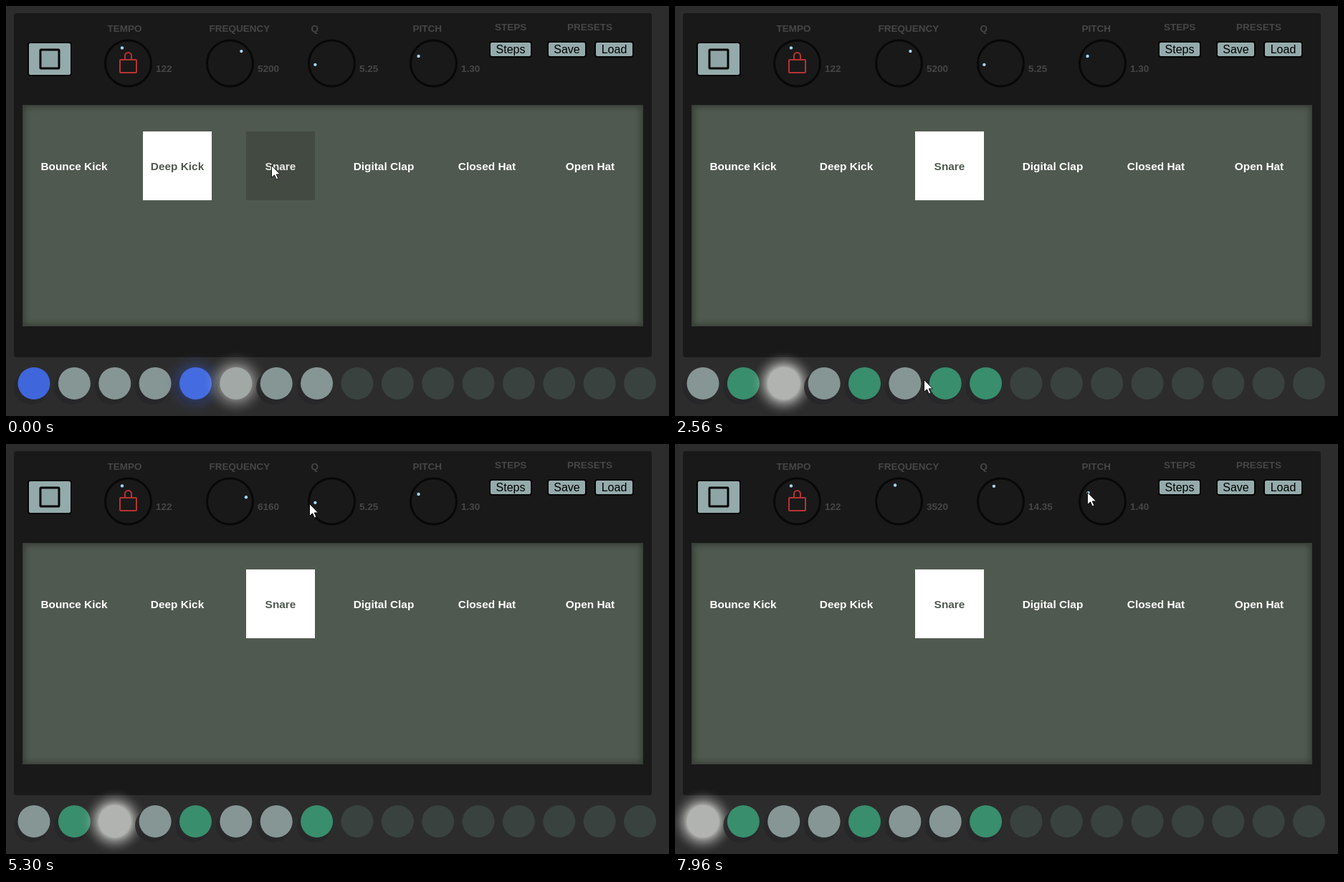
An HTML page with a canvas that plays this animation: 925x572 px, repeating every 8000 ms.

```html
<!DOCTYPE html>
<html lang="en">
<head>
<meta charset="utf-8">
<title>Drum machine</title>
<style>
html, body { margin: 0; width: 100%; height: 100%; overflow: hidden; background: #2c2c2c; }
canvas { display: block; }
</style>
</head>
<body>
<canvas id="stage" width="925" height="572"></canvas>
<script>
const ctx = document.getElementById('stage').getContext('2d');
const LOOP = 8000, TAU = Math.PI * 2;
const STEP = 117.3, STEP_OFFSET = 10, FIRST_STEP = 5, FADE = 28;
const PAD_GAP = 56.37, PAD_Y = 526.5, PAD_RADIUS = 22.5;
const SANS = '"Liberation Sans", Arial, sans-serif';
const INSTRUMENTS = ['Bounce Kick', 'Deep Kick', 'Snare', 'Digital Clap', 'Closed Hat', 'Open Hat'];

const BLUE = { base: [63, 102, 219], lit: [77, 116, 232], glow: [63, 102, 235] };
const GREEN = { base: [57, 142, 109], lit: [0, 229, 140], glow: [0, 229, 140] };
const GRAY = { base: [134, 150, 149], lit: [177, 179, 176], glow: [225, 228, 222] };

const INITIAL = { x: 370, y: 222, frequency: 5200, q: 5.25, pitch: 1.3 };
const PICK_SNARE = 380;
// Eased pointer gestures; a drag also changes a knob's value
const GESTURES = [
  { from: 890, until: 1470, x: 392, y: 470 },
  { from: 1470, until: 2050, x: 98, y: 521, toggles: 1 },
  { from: 2250, until: 2633, x: 372, y: 521, toggles: 6 },
  { from: 3617, until: 4350, x: 322, y: 66 },
  { from: 4450, until: 4900, x: 336, y: 79, frequency: 6160 },
  { from: 5060, until: 5300, x: 423, y: 83 },
  { from: 5430, until: 5980, x: 446, y: 64, q: 14.35 },
  { from: 6100, until: 6400, x: 335, y: 75 },
  { from: 6480, until: 7414, x: 306, y: 63, frequency: 3520 },
  { from: 7414, until: 7620, x: 575, y: 67, },
  { from: 7740, until: 7900, pitch: 1.4 }
];

const lerp = (a, b, p) => a + (b - a) * p;
const smooth = p => p * p * (3 - 2 * p);
const clamp = p => Math.max(0, Math.min(1, p));
const rgba = (c, alpha = 1) => `rgba(${c.map(Math.round)},${alpha})`;
const snap = (value, unit) => Math.round(value / unit) * unit;

function stateAt(t) {
  const state = { ...INITIAL };
  const snareHits = new Set([4, 6, 7]);
  for (const g of GESTURES) {
    const p = smooth(clamp((t - g.from) / (g.until - g.from)));
    for (const key in INITIAL) if (key in g) state[key] = lerp(state[key], g[key], p);
    if (p === 1 && 'toggles' in g && !snareHits.delete(g.toggles)) snareHits.add(g.toggles);
  }
  const snare = t >= PICK_SNARE;
  state.selected = snare ? 2 : 1;
  state.hits = snare ? snareHits : new Set([0, 4]);
  state.hitHue = snare ? GREEN : BLUE;
  return state;
}

function box(x, y, w, h, radius, fill, stroke, width = 2) {
  ctx.beginPath();
  ctx.roundRect(x, y, w, h, radius);
  if (fill) { ctx.fillStyle = fill; ctx.fill(); }
  if (stroke) { ctx.strokeStyle = stroke; ctx.lineWidth = width; ctx.stroke(); }
}

function disc(x, y, r, fill) {
  ctx.beginPath();
  ctx.arc(x, y, r, 0, TAU);
  ctx.fillStyle = fill;
  ctx.fill();
}

function text(str, x, y, color, font, align = 'left') {
  ctx.font = `${font} ${SANS}`;
  ctx.textAlign = align;
  ctx.fillStyle = color;
  ctx.fillText(str, x, y);
}
const label = (str, x, y) => text(str, x, y, '#464646', 'bold 13.5px');

function button(str, x, w) {
  box(x, 50, w, 21, 3, '#95abab', '#050505');
  text(str, x + w / 2, 66, '#000', '16px', 'center');
}

function knob(index, name, value, degrees) {
  const x = 170.5 + index * 142;
  label(name, x - 29, 36);
  label(value, x + 38.5, 92);
  ctx.beginPath();
  ctx.arc(x, 80, 32, 0, TAU);
  ctx.strokeStyle = '#080808';
  ctx.lineWidth = 3;
  ctx.stroke();
  const a = degrees * Math.PI / 180;
  disc(x + Math.sin(a) * 23.2, 80 - Math.cos(a) * 23.2, 2.2, '#a6d5ef');
}

function padlock() {
  box(159, 75, 23, 18, 1, null, '#b83232');
  ctx.beginPath();
  ctx.moveTo(166, 75);
  ctx.arc(170.5, 69.5, 4.5, Math.PI, 0);
  ctx.lineTo(175, 75);
  ctx.stroke();
}

function controls(state) {
  box(31, 51, 60, 46, 3, '#95abab', '#050505');
  box(48, 61, 26, 26, 1, '#8fa5a5', '#050505', 3);

  const frequency = snap(state.frequency, 80);
  const q = snap(state.q, 0.35);
  const pitch = snap(state.pitch, 0.05);
  knob(0, 'TEMPO', '122', -21.5);
  padlock();
  knob(1, 'FREQUENCY', String(frequency), (frequency - 3920) / 29.63);
  knob(2, 'Q', q.toFixed(2), (q - 17.5) / 0.1296);
  knob(3, 'PITCH', pitch.toFixed(2), -64.5 + (pitch - 1.3) * 54);

  label('STEPS', 682, 34);
  label('PRESETS', 783, 34);
  button('Steps', 675, 58);
  button('Save', 756, 53);
  button('Load', 822, 53);
}

function screen(state) {
  ctx.save();
  ctx.beginPath();
  ctx.rect(23, 138, 866, 309);
  ctx.clip();
  ctx.fillStyle = '#50594f';
  ctx.fillRect(23, 138, 866, 309);
  ctx.shadowColor = 'rgba(0,0,0,.65)';
  ctx.shadowBlur = 10;
  ctx.strokeStyle = '#363d36';
  ctx.lineWidth = 4;
  ctx.strokeRect(22, 137, 868, 311);
  ctx.restore();

  INSTRUMENTS.forEach((name, i) => {
    const x = 47 + i * 144;
    const selected = i === state.selected;
    const hovered = i === 2 && !selected;
    if (selected || hovered) {
      ctx.fillStyle = hovered ? '#434a42' : '#fff';
      ctx.fillRect(x, 175, 96, 96);
    }
    const color = selected ? '#50594f' : hovered ? '#e8e8e4' : '#fff';
    text(name, x + 48, 229, color, 'bold 15.4px', 'center');
  });
}

function glow(x, y, color, level) {
  const reach = 47, bands = 8;
  const g = ctx.createRadialGradient(x, y, PAD_RADIUS - 1, x, y, reach);
  for (let i = 0; i <= bands; i++) {
    const p = i / bands;
    g.addColorStop(p, rgba(color, 0.75 * level * (1 - p) ** 2));
  }
  disc(x, y, reach, g);
}

function pads(t, state) {
  const elapsed = t + STEP_OFFSET;
  const current = (Math.floor(elapsed / STEP) + FIRST_STEP) % 8;
  const previous = (current + 7) % 8;
  const fadeIn = 1 - (1 - clamp(elapsed % STEP / FADE)) ** 2;
  for (let i = 0; i < 16; i++) {
    const x = 39 + i * PAD_GAP;
    if (i > 7) { disc(x, PAD_Y, PAD_RADIUS, '#3a4240'); continue; }
    const hue = state.hits.has(i) ? state.hitHue : GRAY;
    const level = i === current ? fadeIn : i === previous ? 1 - fadeIn : 0;
    disc(x - 4, PAD_Y + 5.5, 24, 'rgba(38,38,41,.85)');
    if (level) glow(x, PAD_Y, hue.glow, level);
    disc(x, PAD_Y, PAD_RADIUS, rgba(hue.base.map((c, k) => lerp(c, hue.lit[k], level))));
  }
}

const arrow = new Path2D('M0 0V17L4 13.3L6.8 19.4L9.4 18.2L6.7 12.4H12Z');
function pointer({ x, y }) {
  ctx.save();
  ctx.translate(Math.round(x) + 0.5, Math.round(y) + 0.5);
  ctx.fillStyle = '#fff';
  ctx.strokeStyle = '#111';
  ctx.lineWidth = 1;
  ctx.fill(arrow);
  ctx.stroke(arrow);
  ctx.restore();
}

function draw(t) {
  const state = stateAt(t);
  ctx.fillStyle = '#2c2c2c';
  ctx.fillRect(0, 0, 925, 572);
  box(11, 10, 890, 480, 4, '#191919');
  controls(state);
  screen(state);
  pads(t, state);
  pointer(state);
}

const start = performance.now();
function frame() {
  draw((performance.now() - start) % LOOP);
  requestAnimationFrame(frame);
}
frame();
</script>
</body>
</html>
```
